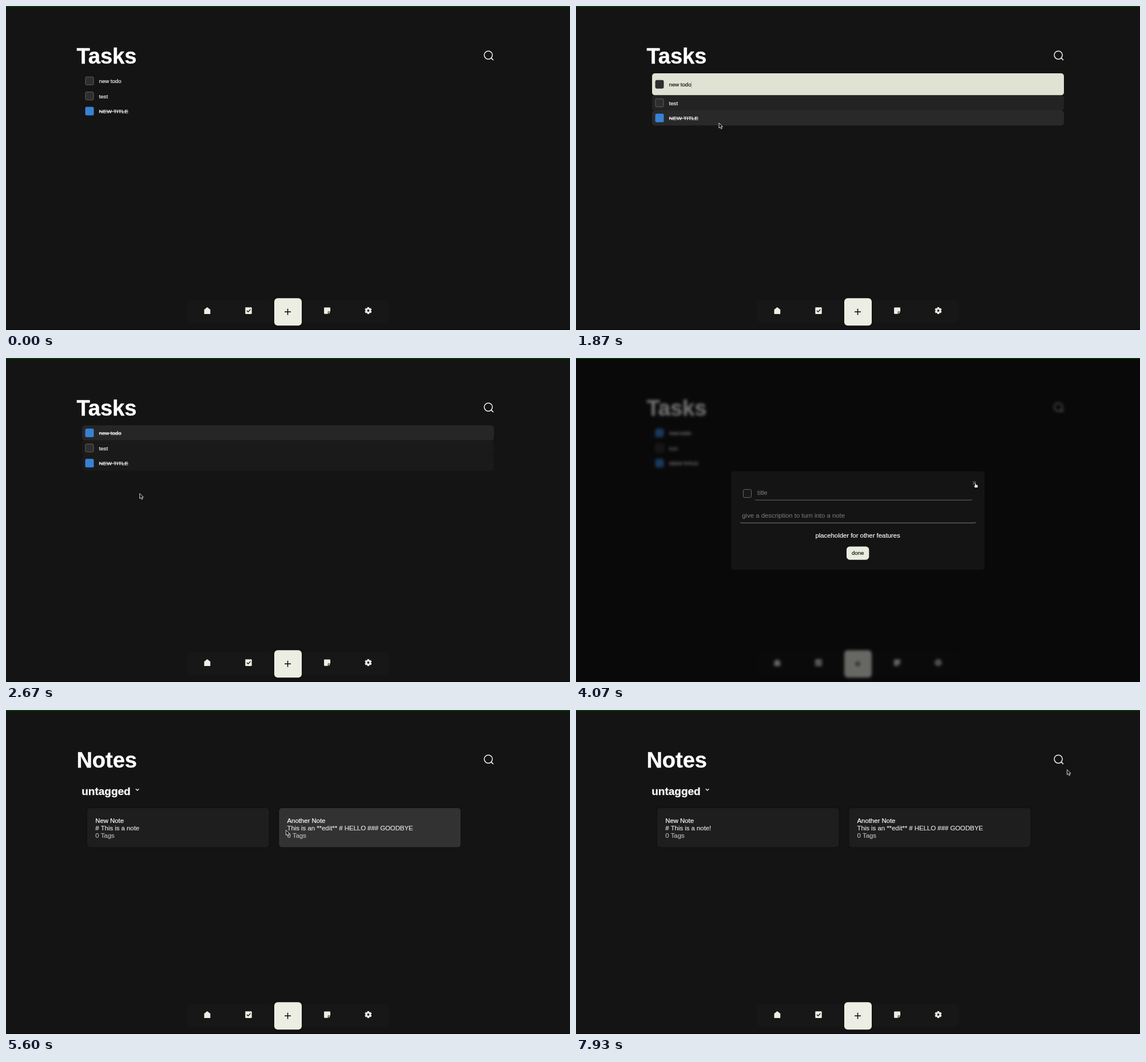
Write an HTML page with a canvas that moves like this. It is 986x568 px and loops after 8000 ms.

```html
<!DOCTYPE html>
<html lang="en">
<head>
<meta charset="utf-8">
<title>Tasks and notes</title>
<style>
html, body { margin: 0; width: 100%; height: 100%; overflow: hidden; background: #141414; }
canvas { display: block; width: 100vw; height: 100vh; }
</style>
</head>
<body>
<canvas id="stage" width="986" height="568"></canvas>
<script>
const W = 986, H = 568, LOOP = 8000;
const BG = [20, 20, 20], CARD = [30, 30, 30], HOVER = [50, 50, 50], CREAM = [224, 226, 212];
const LIGHT = '#eceee3', BLUE = '#3882d4';
const SANS = '"Liberation Sans", Arial, Helvetica, sans-serif';

const screen = document.getElementById('stage').getContext('2d');
const pageCanvas = document.createElement('canvas');
pageCanvas.width = W;
pageCanvas.height = H;
const page = pageCanvas.getContext('2d');
let c = page;

const clamp = v => Math.max(0, Math.min(1, v));
const easeOut = v => 1 - (1 - v) ** 2;
const ramp = (t, from, span) => easeOut(clamp((t - from) / span));
const lerp = (a, b, k) => a + (b - a) * k;
const mix = (a, b, k) => a.map((v, i) => lerp(v, b[i], k));
const rgb = a => `rgb(${a.map(Math.round).join(',')})`;

// Places the pointer heads for, and what happens there.
const ENTRY = { x: 300, y: 514 };
const MOVES = [
  { at: 270, span: 800, x: 232, y: 129 },
  { at: 1720, span: 210, x: 251, y: 211 },
  { at: 1940, span: 440, x: 147, y: 138, link: true },
  { at: 2600, span: 530, x: 492, y: 534, link: true },
  { at: 3400, span: 600, x: 697.6, y: 218, link: true },
  { at: 4270, span: 550, x: 561, y: 533, link: true },
  { at: 5130, span: 470, x: 489, y: 210 },
  { at: 5640, span: 290, x: 419, y: 238 },
  { at: 6470, span: 730, x: 858, y: 104 }
];
const OPEN = 1130, CHECK = 2400, SAVE = 2500, ADD = 3190, CANCEL = 4200;
const GO_NOTES = 4870, EDIT = 6000, TYPE = 6300, CLOSE = 7870;

function pointerAt(t) {
  let { x, y } = ENTRY, hand = false;
  for (const m of MOVES) {
    if (t < m.at) break;
    const k = ramp(t, m.at, m.span);
    x = lerp(x, m.x, k);
    y = lerp(y, m.y, k);
    hand = m.link && Math.hypot(m.x - x, m.y - y) < 14;
  }
  return { x, y, hand };
}

// Share of the last moments the pointer spent inside an area, as a soft fade.
function hover(t, x, y, w, h) {
  const samples = 13, step = 10;
  let inside = 0;
  for (let i = 0; i < samples; i++) {
    const p = pointerAt(t - i * step);
    if (p.x >= x && p.x < x + w && p.y >= y && p.y < y + h) inside++;
  }
  return clamp(1.3 * inside / samples);
}

function box(x, y, w, h, r, fill, stroke) {
  c.beginPath();
  c.roundRect(x, y, w, h, r);
  if (fill) { c.fillStyle = fill; c.fill(); }
  if (stroke) { c.strokeStyle = stroke; c.lineWidth = 1; c.stroke(); }
}

function raised(blur, ...args) {
  c.shadowColor = 'rgba(0,0,0,.4)';
  c.shadowBlur = blur;
  box(...args);
  c.shadowBlur = 0;
}

function line(color, width, ...points) {
  c.beginPath();
  points.forEach(p => c.lineTo(...p));
  c.strokeStyle = color;
  c.lineWidth = width;
  c.stroke();
}

function shape(color, ...points) {
  c.beginPath();
  points.forEach(p => c.lineTo(...p));
  c.fillStyle = color;
  c.fill();
}

function text(str, x, y, size, color, { bold = false, align = 'left', weight = .2 } = {}) {
  c.font = `${bold ? 'bold ' : ''}${size}px ${SANS}`;
  c.textAlign = align;
  c.fillStyle = c.strokeStyle = color;
  c.lineWidth = weight;
  c.fillText(str, x, y);
  if (weight) c.strokeText(str, x, y);
  return c.measureText(str).width;
}

function header(title) {
  text(title, 123.4, 100.7, 38, '#fff', { bold: true, weight: .4 });
  c.beginPath();
  c.arc(843.2, 86.1, 7.1, 0, Math.PI * 2);
  c.strokeStyle = '#f4f4f4';
  c.lineWidth = 1.5;
  c.stroke();
  line('#f4f4f4', 1.5, [848.2, 91.1], [852, 94.9]);
}

function nav() {
  box(316, 516, 354, 39, 6, '#171717');
  shape(LIGHT, [346.5, 532.3], [351.8, 528], [357.2, 532.3], [357.2, 540], [346.5, 540]);
  box(418.3, 528.3, 11.4, 11.6, 1.2, LIGHT);
  line('#171717', 1.3, [421, 534], [423.3, 536.3], [427.3, 532]);
  box(556, 528.5, 11, 11.3, 1, LIGHT);
  box(562.8, 535.6, 4.4, 4.4, 0, '#171717');
  shape(LIGHT, [563.8, 536.6], [567, 536.6], [563.8, 539.8]);
  gear(633.3, 534);
  raised(4, 469, 512.2, 48, 48, 6, LIGHT);
  line('#111', 1.6, [487, 536.2], [498, 536.2]);
  line('#111', 1.6, [492.5, 530.7], [492.5, 541.7]);
}

function gear(x, y) {
  c.save();
  c.translate(x, y);
  for (let i = 0; i < 6; i++) {
    box(-1.9, -6.1, 3.8, 4, .8, LIGHT);
    c.rotate(Math.PI / 3);
  }
  c.beginPath();
  c.arc(0, 0, 4.6, 0, Math.PI * 2);
  c.arc(0, 0, 1.9, 0, Math.PI * 2, true);
  c.fillStyle = LIGHT;
  c.fill();
  c.restore();
}

function row(label, y, t, done, open) {
  const h = 26.5 + 12 * open, mid = y + h / 2, editing = open > .5;
  const level = hover(t, 133, y, 720, h);
  if (level + open > 0) box(133, y, 720, h, 5, rgb(mix(mix(BG, HOVER, level), CREAM, open)));
  if (done) box(138.5, mid - 7.5, 15, 15, 2.5, BLUE);
  else box(139, mid - 7, 14, 14, 2, '#2e2e2e', editing ? '#2e2e2e' : '#606060');
  const ink = editing ? '#151515' : '#f6f6f6';
  const w = text(label, 162.6, mid + 4.1, 9.6, ink);
  if (done) line(ink, 1, [162.6, mid + .8], [162.6 + w, mid + .8]);
  if (editing) line('#8d97a8', .8, [201.5, mid - 5], [201.5, mid + 6]);
}

function tasks(t) {
  const open = ramp(t, OPEN, 220) * (1 - ramp(t, SAVE, 120));
  const push = 12 * open;
  header('Tasks');
  row('new todo', 118, t, t >= CHECK, open);
  row('test', 144.5 + push, t, false, 0);
  row('NEW TITLE', 171 + push, t, true, 0);
}

function card(x, title, body, t) {
  const level = hover(t, x, 172, 317.5, 68.5);
  raised(3, x, 172, 317.5, 68.5, 5, rgb(mix(CARD, HOVER, level)));
  text(title, x + 14.2, 197.5, 11.35, '#fff');
  text(body, x + 14.2, 210.5, 11.35, '#e2e2e2');
  text('0 Tags', x + 14.2, 223.5, 11.35, '#b8b8b8');
}

const noteBody = edited => '# This is a note' + (edited ? '!' : '');

function notes(t) {
  header('Notes');
  text('untagged', 132.2, 149, 19, '#f8f8f8', { bold: true, weight: .3 });
  line('#f0f0f0', 1.4, [226.8, 138.3], [229.6, 141], [232.4, 138.3]);
  card(142, 'New Note', noteBody(t >= CLOSE), t);
  card(477.3, 'Another Note', 'This is an **edit** # HELLO ### GOODBYE', t);
}

function field(hint, x, y, x1, x2, color) {
  text(hint, x, y, 11.35, '#757575', { weight: .1 });
  line(color, 1, [x1, y + 7.4], [x1 + 1.5, y + 8.8], [x2 - 1.5, y + 8.8], [x2, y + 7.4]);
}

function closeButton(x, y) {
  text('X', x, y, 9.6, '#a0a0a0', { align: 'center', weight: 0 });
}

function taskDialog() {
  box(271.2, 198.5, 443, 172.7, 5, '#141414');
  closeButton(696.2, 222);
  box(292.5, 230.5, 14, 14, 2, '#181818', '#686868');
  field('title', 317, 240.3, 313, 692.5, '#6c6c6c');
  field('give a description to turn into a note', 290.3, 280.3, 287, 699, '#808080');
  text('placeholder for other features', 492.5, 315.2, 11.35, '#fafafa', { align: 'center' });
  box(473, 330.6, 39.3, 23.1, 5.5, '#e9ede0');
  text('done', 492.6, 345.3, 9.6, '#151515', { align: 'center' });
}

function noteDialog(t) {
  box(106, 88, 774, 392, 5, '#141414');
  closeButton(862, 112);
  text('New Note', 126, 130, 11.35, '#fafafa');
  text(noteBody(t >= TYPE), 126, 166, 11.35, '#dedede');
}

function dialog(t, from, to, draw) {
  if (t < from || t >= to) return;
  const k = ramp(t, from, 260);
  c.filter = `blur(${2.6 * k}px)`;
  c.drawImage(pageCanvas, 0, 0);
  c.filter = 'none';
  c.fillStyle = `rgba(0,0,0,${.56 * k})`;
  c.fillRect(0, 0, W, H);
  c.globalAlpha = k;
  draw(t);
  c.globalAlpha = 1;
}

const ARROW = new Path2D('M0 0V9L2.1 7.2L3.6 10.4L5.2 9.7L3.8 6.6H6.6Z');
const HAND = new Path2D('M-1 0H1V3.2L4.8 4.4L4.2 9H-.8L-3 5L-1 5.6Z');

function pointer(t) {
  if (t < MOVES[0].at) return;
  const { x, y, hand } = pointerAt(t);
  const outline = hand ? HAND : ARROW;
  c.save();
  c.translate(x + .5, y + .5);
  c.lineJoin = 'round';
  c.lineWidth = .9;
  c.fillStyle = hand ? '#fff' : '#111';
  c.strokeStyle = hand ? '#111' : '#e8e8e8';
  c.fill(outline);
  c.stroke(outline);
  c.restore();
}

function render(t) {
  c = page;
  c.fillStyle = rgb(BG);
  c.fillRect(0, 0, W, H);
  t < GO_NOTES ? tasks(t) : notes(t);
  nav();

  c = screen;
  c.drawImage(pageCanvas, 0, 0);
  dialog(t, ADD, CANCEL, taskDialog);
  dialog(t, EDIT, CLOSE, noteDialog);
  c.fillStyle = '#004a04';
  c.fillRect(0, 0, W, 1.4);
  c.fillStyle = '#0b0b0b';
  c.fillRect(0, 566.8, W, 1.2);
  pointer(t);
}

const start = performance.now();
function tick() {
  render((performance.now() - start) % LOOP);
  requestAnimationFrame(tick);
}
tick();
</script>
</body>
</html>
```
